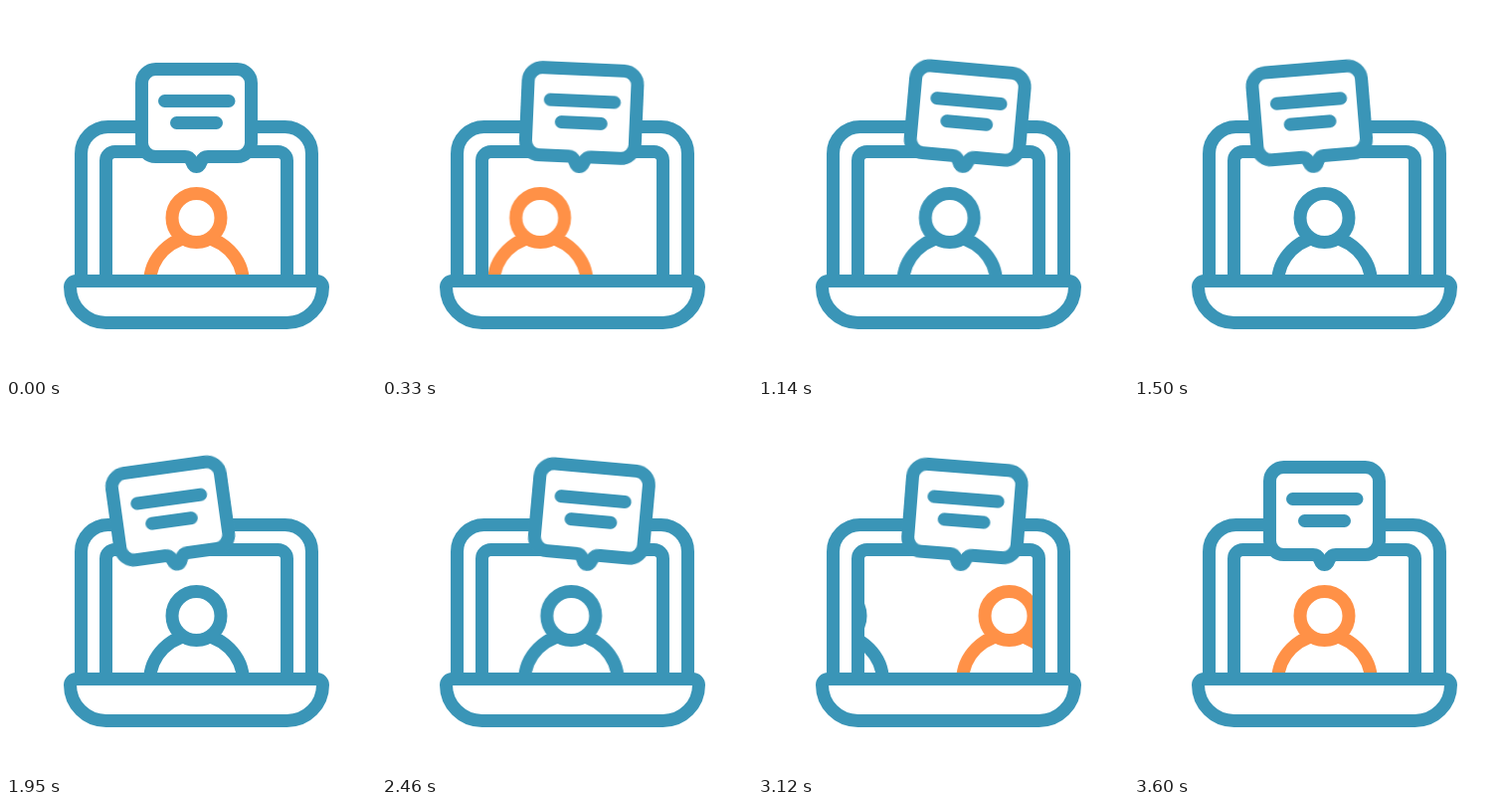
Recreate the animation shown at these times as an HTML page. Size 372 by 372 pixels, loop 3.63 s.

```html
<!DOCTYPE html>
<html lang="en">
<head>
<meta charset="utf-8">
<title>Video call</title>
<style>
  html, body { margin: 0; width: 100%; height: 100%; overflow: hidden; background: #fff; }
  svg { display: block; width: 372px; height: 372px; }

  .line { fill: none; stroke-width: 13; stroke-linecap: round; stroke-linejoin: round; }
  .blue { stroke: #3a95b7; }
  .orange { stroke: #ff9147; }
  .solid { fill: #fff; }

  .people, .bubble {
    animation: slide 3630ms cubic-bezier(.3333, 0, .6667, 1) infinite;
  }
  .bubble {
    animation-name: sway;
    transform-box: view-box;
    transform-origin: 191.5px 107px;
  }

  /* The last 30 ms rest on the opening pose. */
  @keyframes slide {
    0% { transform: translateX(0); }
    33.058%, 66.116% { transform: translateX(-174px); }
    99.174%, 100% { transform: translateX(-348px); }
  }
  @keyframes sway {
    0%, 99.174%, 100% { transform: translateX(0) rotate(0deg); }
    24.793%, 74.38% { transform: translateX(30px) rotate(8.2deg); }
    49.587% { transform: translateX(-31px) rotate(-9.2deg); }
  }
</style>
</head>
<body>
<svg viewBox="0 0 372 372">
  <defs>
    <clipPath id="screen"><rect x="101" y="147" width="181" height="127"/></clipPath>
    <g id="person">
      <circle cx="191.5" cy="279" r="47"/>
      <circle class="solid" cx="191.5" cy="213" r="24.5"/>
    </g>
  </defs>

  <g clip-path="url(#screen)">
    <g class="people line">
      <use href="#person" class="orange"/>
      <use href="#person" class="blue" x="174"/>
      <use href="#person" class="orange" x="348"/>
    </g>
  </g>

  <g class="line blue">
    <path d="M75.5 276.5V148.500a27 27 0 0 1 27-27H280.500a27 27 0 0 1 27 27V276.500"/>
    <path d="M100.500 276.500V155.500a9 9 0 0 1 9-9H273.500a9 9 0 0 1 9 9V276.500"/>
    <path class="solid" d="M70.500 276.500H312.500a6 6 0 0 1 6 6a36 36 0 0 1-36 36H100.500a36 36 0 0 1-36-36a6 6 0 0 1 6-6Z"/>
  </g>

  <g class="bubble line blue">
    <path class="solid" d="M150.500 63.500H232.500a14 14 0 0 1 14 14V137.500a14 14 0 0 1-14 14H203
      Q198.500 151.500 196.500 156Q194.500 161.500 191.500 161.500Q188.500 161.500 186.500 156Q184.500 151.500 180 151.500
      H150.500a14 14 0 0 1-14-14V77.500a14 14 0 0 1 14-14Z"/>
    <path d="M159.500 95.500H224M171.500 117.500H211.500"/>
  </g>
</svg>
</body>
</html>
```
